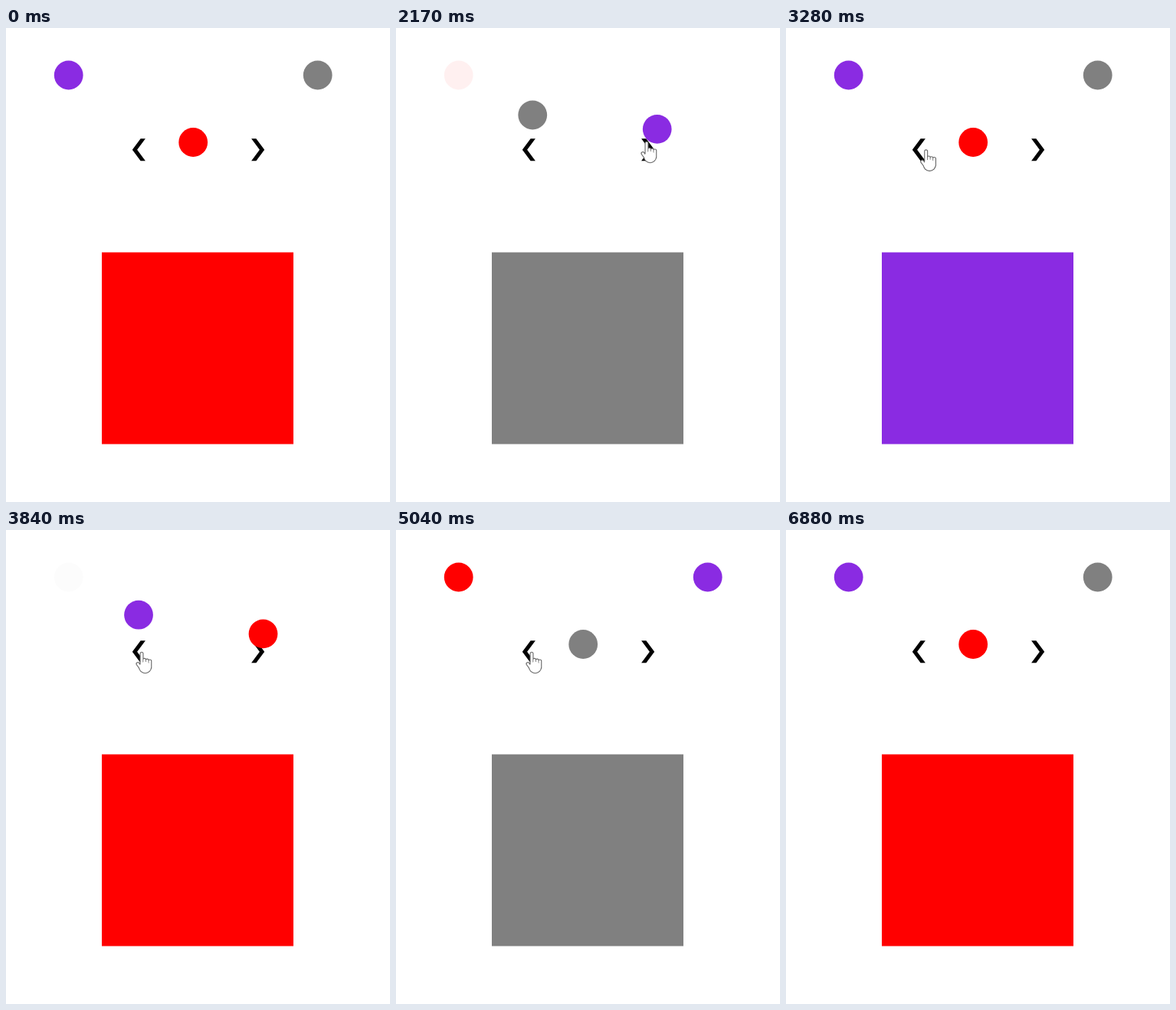
An HTML page with a canvas for the animation above (8.29 s loop, 501x618 px).

```html
<!DOCTYPE html>
<html lang="en">
<head>
<meta charset="utf-8">
<title>Colour carousel</title>
<style>
html, body { margin: 0; width: 100%; height: 100%; overflow: hidden; background: #fff; }
canvas { display: block; }
</style>
</head>
<body>
<canvas id="stage" width="501" height="618"></canvas>
<script>
const ctx = document.getElementById('stage').getContext('2d');
const LOOP = 8290, MOVE = 500, SETTLE = 605;
const COLORS = ['#8a2be2', '#ff0000', '#808080'];
const LEFT = { x: 81.7, y: 61.5 }, MID = { x: 244.2, y: 149 }, RIGHT = { x: 406.7, y: 61.5 };
const ARC_Y = 177.5; // control height of the curve between MID and RIGHT

// Three clicks on "next", then three on "previous"
const CLICKS = [1093, 1968, 2775, 3560, 4400, 5540];
const direction = i => i < 3 ? 1 : -1;

// Pointer positions and the moves between them
const BELOW = { x: 298, y: 604 }, NEXT = { x: 327, y: 148 };
const PREV = { x: 177, y: 159 }, AWAY = { x: 268, y: 625 };
const MOVES = [
  { start: 160, end: 780, to: NEXT },
  { start: 2790, end: 3400, to: PREV },
  { start: 6270, end: 6570, to: AWAY }
];

const lerp = (a, b, p) => a + (b - a) * p;
const mix = (a, b, p) => ({ x: lerp(a.x, b.x, p), y: lerp(a.y, b.y, p) });
const clamp = v => Math.max(0, Math.min(1, v));
const easeOut = p => 1 - (1 - p) ** 2;
const easeInOut = p => p < 0.5 ? (2 * p) ** 2.2 / 2 : 1 - (2 - 2 * p) ** 2.2 / 2;
const colorAt = i => COLORS[i % 3];

function disc({ x, y }, color, alpha = 1) {
  ctx.globalAlpha = alpha;
  ctx.fillStyle = color;
  ctx.beginPath();
  ctx.arc(x, y, 18.9, 0, Math.PI * 2);
  ctx.fill();
  ctx.globalAlpha = 1;
}

function polygon(points) {
  ctx.beginPath();
  points.forEach(([x, y]) => ctx.lineTo(x, y));
  ctx.closePath();
}

function chevron(tip, dir) {
  const y = 158.8, h = 14.5, reach = tip + dir * 10.8, thick = dir * 6.3;
  polygon([
    [tip, y], [reach, y - h], [reach + thick, y - h],
    [tip + thick, y], [reach + thick, y + h], [reach, y + h]
  ]);
  ctx.fillStyle = '#000';
  ctx.fill();
}

// A whole step moves every disc one seat on; the third fades across
function carousel(shift) {
  const k = Math.floor(shift), p = shift - k;
  const control = { x: (MID.x + RIGHT.x) / 2, y: ARC_Y };
  disc(p < 0.5 ? LEFT : RIGHT, colorAt(k), easeInOut(Math.abs(1 - 2 * p)));
  disc(mix(MID, LEFT, p), colorAt(k + 1));
  disc(mix(mix(RIGHT, control, p), mix(control, MID, p), p), colorAt(k + 2));
}

function hand() {
  ctx.lineCap = 'round';
  // A wide grey pass under a white one leaves the outline
  for (const [color, edge] of [['#666', 1.1], ['#fff', 0]]) {
    ctx.strokeStyle = ctx.fillStyle = color;
    ctx.lineWidth = 2.8 + 2 * edge;
    ctx.beginPath();
    for (let i = 0; i < 4; i++) {
      const x = i * 3.6;
      ctx.moveTo(x, i ? 9.5 + i * 0.8 : 2.2);
      ctx.lineTo(x, i < 3 ? 17 : 20);
    }
    ctx.moveTo(-5, 15.6);
    ctx.lineTo(-1, 21);
    ctx.stroke();
    ctx.beginPath();
    ctx.ellipse(4.6, 20, 7.4 + edge, 7.2 + edge, 0, 0, Math.PI * 2);
    ctx.fill();
  }
}

function arrow() {
  polygon([[0, 0], [0, 17], [4.5, 12.5], [12, 12.5]]);
  ctx.lineWidth = 1.2;
  ctx.fillStyle = '#fff';
  ctx.strokeStyle = '#666';
  ctx.fill();
  ctx.stroke();
}

function cursor(t) {
  if (t < MOVES[0].start || t >= MOVES[2].end) return;
  let at = BELOW;
  for (const { start, end, to } of MOVES) {
    at = mix(at, to, easeOut(clamp((t - start) / (end - start))));
  }
  const near = spot => Math.abs(at.x - spot.x) < 14 && Math.abs(at.y - spot.y) < 18;
  ctx.save();
  ctx.translate(at.x, at.y);
  if (near(NEXT) || near(PREV)) hand();
  else arrow();
  ctx.restore();
}

function draw(t) {
  let shift = 0, shown = 0;
  CLICKS.forEach((start, i) => {
    shift += direction(i) * clamp((t - start) / MOVE);
    if (t >= start + SETTLE) shown += direction(i);
  });
  ctx.fillStyle = '#fff';
  ctx.fillRect(0, 0, 501, 618);
  ctx.fillStyle = colorAt(shown + 1);
  ctx.fillRect(125, 292.5, 250, 250);
  chevron(164.8, 1);
  chevron(337.2, -1);
  carousel(Math.max(0, shift));
  cursor(t);
}

const begin = performance.now();
function tick() {
  draw((performance.now() - begin) % LOOP);
  requestAnimationFrame(tick);
}
tick();
</script>
</body>
</html>
```
